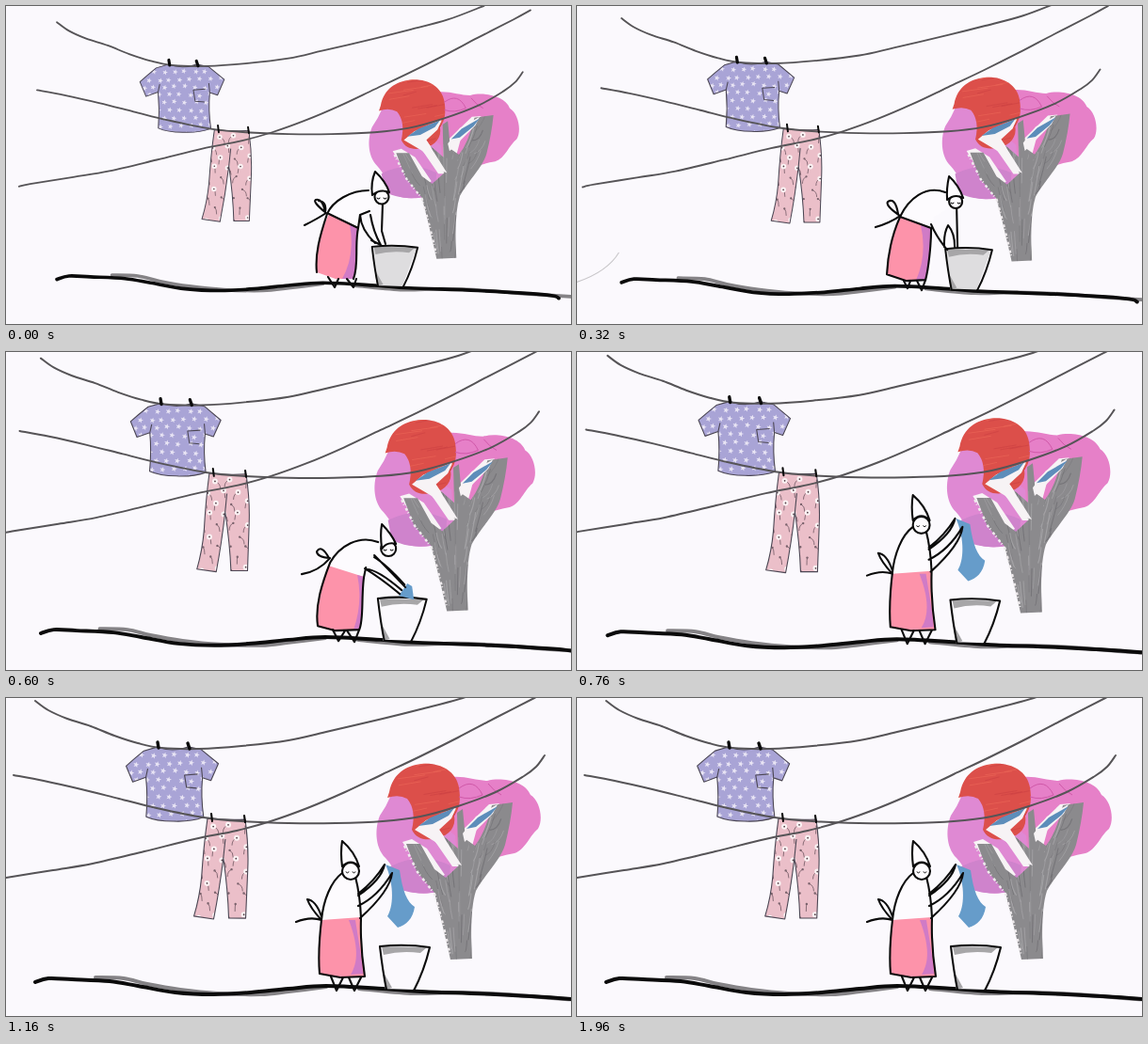
These frames come from a looping animation (600 by 338 pixels, 2000 ms). An HTML page:

```html
<!DOCTYPE html>
<html lang="en">
<head>
<meta charset="utf-8">
<title>Washing day</title>
<style>
html, body { margin: 0; width: 100%; height: 100%; overflow: hidden; background: #fbf9fd; }
svg { display: block; width: 100vw; height: 100vh; }
.ink, .shadow { fill: none; stroke: #0b0b0b; stroke-width: 2.1; stroke-linecap: round; stroke-linejoin: round; }
.shadow { stroke: #858386; stroke-width: 4; }
.earth { stroke-width: 4; }
.peg { stroke-width: 3.4; }
.rope { fill: none; stroke: #565457; stroke-width: 2; stroke-linecap: round; }
.paper { fill: #fdfbfe; }
.skirt { fill: #fd93aa; }
.shade { fill: #d07bc6; }
.cloth { fill: #669cca; }
.seam { fill: none; stroke: #4b4653; stroke-width: 1.1; stroke-linejoin: round; }
</style>
</head>
<body>
<svg viewBox="0 0 600 338" preserveAspectRatio="none">
  <defs>
    <path id="shirtShape" d="M147 56L161 52Q178 58 194 52L208 55L226 70L218 88L209 85Q207 105 210 127Q195 132 178 131Q160 131 149 126Q151 105 149 84L135 89L128 72Q137 64 147 56Z"/>
    <path id="pantsShape" d="M214 128Q235 130 254 129Q258 157 257 182L255 234L237 234Q236 204 231 170Q227 204 221 235L200 232Q206 212 208 190Q210 157 214 128Z"/>
    <path id="trunkShape" d="M472 278L495 277Q492 227 499 205C508 188 526 171 530 156Q536 132 538 111L516 114Q509 143 498 157L488 150L485 118L479 122L480 160L465 147L471 166L481 178L467 191L455 182L440 155L425 155L436 184L455 207Q464 242 472 278Z"/>
    <path id="crownShape" d="M407 100C411 80 425 72 441 70C460 68 478 77 481 95C483 108 482 117 476 125C478 137 471 146 458 149C445 152 436 150 431 140Q436 119 426 107Q417 102 405 106Z"/>
    <clipPath id="shirtClip"><use href="#shirtShape"/></clipPath>
    <clipPath id="pantsClip"><use href="#pantsShape"/></clipPath>
    <clipPath id="trunkClip"><use href="#trunkShape"/></clipPath>
    <clipPath id="crownClip"><use href="#crownShape"/></clipPath>
  </defs>
  <g id="camera">
    <g id="tree">
      <path fill="#e680c8" d="M474 84C488 83 500 88 511 88C526 84 551 88 557 103C567 109 571 129 565 139C556 146 552 161 540 165Q522 168 508 175L470 160Z"/>
      <path fill="#df89d3" d="M409 103C426 100 434 108 444 121L477 146L481 195C459 212 430 210 416 200C415 186 410 178 403 170C391 158 392 137 397 125Q404 115 409 103Z"/>
      <path fill="#cf83cc" d="M408 179Q440 163 472 178L470 200C457 211 425 209 412 200Z"/>
      <use href="#crownShape" fill="#dc4f4a"/>
      <g id="crownGrain" clip-path="url(#crownClip)"></g>
      <path fill="none" stroke="#cf58a8" d="M481 96Q497 84 506 103Q493 109 481 105M512 91Q518 99 526 103"/>
      <path fill="#f7f3f5" d="M421 153L431 150L447 160L466 188L456 193L436 177ZM434 140L446 130L478 116L472 126L458 137L487 179L474 179L456 153ZM480 164L480 145L513 113L524 112L500 139L493 165Z"/>
      <use href="#trunkShape" fill="#8b8a8d"/>
      <g id="trunkGrain" clip-path="url(#trunkClip)"></g>
      <path fill="#f7f3f5" d="M438 138L463 126L478 117L473 128L460 140L484 178L478 176L452 149ZM485 144L499 126L522 113L517 123L499 141L487 153Z"/>
      <path fill="#5d8dba" d="M438 136L451 127L476 117L470 125L453 134ZM489 139L501 127L522 115L515 124L499 137Z"/>
      <path fill="none" stroke="#eeeaec" stroke-width="2.5" stroke-dasharray="3 2 1 4" d="M423 157L437 185L455 208Q465 242 472 275"/>
    </g>
    <g id="ground"></g>
    <g id="shirt">
      <use href="#shirtShape" fill="#a9a4d6"/>
      <g id="stars" clip-path="url(#shirtClip)" fill="#e8e4f4"></g>
      <use href="#shirtShape" class="seam"/>
      <path class="seam" d="M204 81L190 82L192 95L203 96M149 84L151 75M209 85L208 74"/>
    </g>
    <g id="pants">
      <use href="#pantsShape" fill="#ebbfc9"/>
      <g id="flowers" clip-path="url(#pantsClip)"></g>
      <use href="#pantsShape" class="seam"/>
      <path class="seam" d="M231 170L233 150"/>
    </g>
    <g id="ropes"></g>
    <path class="ink peg" d="M161 47L162 53M193 48L195 54"/>
    <path class="ink" d="M218 123L219 131M253 125L254 132"/>
    <g id="bucket">
      <path id="bucketFill" d="M397 264L449 265L432 311L403 310Z"/>
      <path fill="#a7a6a8" d="M399 264L447 265L440 271Q420 268 401 273Z"/>
      <path fill="#a7a6a8" d="M400 290L410 308L403 310Z"/>
      <path class="ink" d="M397 264Q424 261 450 265Q444 290 433 311L404 310Q400 290 397 264"/>
    </g>
    <g id="poses"></g>
    <path id="wisp" fill="none" stroke="#c9c7ca" stroke-width="1.2" d="M-21 302Q15 290 28 268"/>
  </g>
</svg>
<script>
const LOOP = 2000, ZOOM = 1.0936, ZOOM_TIME = 900;
const $ = id => document.getElementById(id);
const add = (id, markup) => $(id).insertAdjacentHTML('beforeend', markup);
const path = (cls, d) => `<path class="${cls}" d="${d}"/>`;
const about = k => `translate(300 169) scale(${k}) translate(-300 -169)`;

let seed = 7;
const rand = () => (seed = seed * 16807 % 2147483647) / 2147483647;

// Smooth curve through points given as "x,y x,y ..."
function curve(text) {
  const p = text.split(' ').map(s => s.split(',').map(Number));
  let d = `M${p[0]}`;
  for (let i = 0; i < p.length - 1; i++) {
    const a = p[i - 1] || p[i], b = p[i], c = p[i + 1], e = p[i + 2] || c;
    d += `C${b.map((v, j) => v + (c[j] - a[j]) / 6)} ${c.map((v, j) => v - (e[j] - b[j]) / 6)} ${c}`;
  }
  return d;
}

[
  '31,3 45,13 65,22 90,30 115,40 140,48 165,53 205,54 250,51 300,45 340,36 400,22 440,12 485,0 527,-16',
  '8,82 40,88 80,97 120,107 160,117 210,127 250,131 300,133 350,133 400,131 440,126 480,115 520,100 550,83 563,73 572,61',
  '-13,194 0,191 50,183 92,176 147,163 200,150 245,141 281,131 320,117 360,100 400,81 440,62 480,42 520,21 561,0 581,-11'
].forEach(points => add('ropes', path('rope', curve(points))));

add('ground',
  path('shadow', curve('95,297 125,298 150,304 185,310 225,314 270,315 300,312 340,307')) +
  path('shadow', curve('375,309 430,314 480,313 530,315 580,319 628,322')) +
  path('ink earth', curve('31,302 45,298 70,299 110,301 140,306 180,313 220,315 260,313 300,309 340,306 400,309 440,312 520,315 600,320 614,324')));

// Wood grain
for (let i = 0; i < 130; i++) {
  const x = 422 + rand() * 116, y = 110 + rand() * 155, tilt = (x - 482) * .28;
  const tone = rand() < .5 ? '#6c6b6f' : '#aeadb0';
  add('trunkGrain', `<path d="M${x} ${y}q${-tilt * .3} 12 ${-tilt} ${12 + rand() * 22}" fill="none" stroke="${tone}" stroke-width="${.5 + rand() * .8}" opacity=".65"/>`);
}
for (let i = 0; i < 22; i++) {
  const x = 405 + rand() * 65, y = 72 + rand() * 75;
  add('crownGrain', `<path d="M${x} ${y}l${14 + rand() * 18} -4" stroke="${rand() < .5 ? '#ef6b5b' : '#c93f43'}" opacity=".55"/>`);
}

// Shirt stars
function star(x, y, r) {
  const points = Array.from({ length: 10 }, (_, i) => {
    const angle = i * Math.PI / 5 - 1.3, q = i % 2 ? r * .42 : r;
    return `${x + q * Math.cos(angle)},${y + q * Math.sin(angle)}`;
  });
  return `<polygon points="${points.join(' ')}"/>`;
}
for (let row = 0; row < 9; row++)
  for (let col = 0; col < 9; col++)
    add('stars', star(131 + col * 12 + (row % 2) * 6 + rand() * 3, 59 + row * 9 + rand() * 3, 3.3));

// Pants flowers
for (let row = 0; row < 9; row++)
  for (let col = 0; col < 4; col++) {
    const x = 204 + col * 16 + (row % 2) * 8 + rand() * 4, y = 134 + row * 12 + rand() * 4;
    const dx = rand() * 12 - 6;
    add('flowers', `<path d="M${x} ${y}q${dx} 2 ${dx} 8" fill="none" stroke="#6d5560" stroke-width=".8"/>` +
      (rand() < .6 ? `<circle cx="${x}" cy="${y}" r="3" fill="#fbf3f4"/><circle cx="${x}" cy="${y}" r=".9" fill="#55434b"/>` : `<circle cx="${x}" cy="${y}" r="1.2" fill="#7a626c"/>`));
  }

const face = (x, y, r) =>
  `<circle class="ink" cx="${x}" cy="${y}" r="${r}" style="fill:#fdfbfe"/>` +
  `<path class="ink" style="stroke-width:1" d="M${x - 5} ${y + 1}q1.5 2 3 0M${x + 2} ${y + 1}q1.5 2 3 0"/>`;
const hat = d => path('paper', d) + path('ink', d);

// Each pose: time it ends, zoom it is laid out at, drawing
const poses = [
  { end: 240, k: ZOOM, art:
    path('paper', 'M392 198C372 190 350 203 342 221L374 237L376 222L398 210Z') +
    path('skirt', 'M343 221L374 236C370 255 375 275 369 290L350 290L330 283C328 262 334 240 343 221Z') +
    path('shade', 'M365 232L374 236C370 255 375 275 369 290L357 290Q371 265 365 232Z') +
    path('ink', 'M385 196C366 196 347 207 341 221C333 245 328 264 330 283M374 236C370 255 375 275 369 290M343 221L374 236L376 222L386 218M376 222Q377 238 392 252M387 222Q390 240 398 254L388 249M400 210L399 239L403 253') +
    path('ink', 'M317 233Q331 226 340 220Q325 208 329 206Q336 204 339 219Q341 208 332 207M342 288L349 299L353 290M362 290L369 299L372 290') +
    face(399, 203, 7.5) + hat('M389 201Q387 188 392 176Q403 186 407 198Q397 194 389 201Z') },
  { end: 440, k: ZOOM / 1.026, art:
    path('paper', 'M395 195C370 190 352 205 344 224L376 236L379 224L400 212Z') +
    path('skirt', 'M343 224L376 236C376 255 373 280 370 291L350 292L329 285C330 265 336 240 343 224Z') +
    path('shade', 'M365 233L376 236C376 255 373 280 370 291L360 291Q372 264 365 233Z') +
    path('ink', 'M391 198C370 190 352 205 343 224C335 242 330 265 329 285L350 292L370 291C373 280 376 255 376 236L343 224M376 232Q382 246 393 259M390 256Q389 242 394 233Q401 241 401 256M403 214L404 256') +
    path('ink', 'M317 235Q333 230 343 223Q327 212 330 208Q338 203 341 221M347 292L351 300L354 292M361 292L366 302L370 291') +
    face(402, 208, 7) + hat('M393 206Q392 194 395 181Q405 190 410 204Q401 199 393 206Z') },
  { end: 680, k: ZOOM / 1.068, art:
    path('cloth', 'M426 246L417 259L433 263L431 249Z') +
    path('paper', 'M396 202C375 194 353 207 342 227L380 239L398 216Z') +
    path('skirt', 'M342 227L380 239C377 260 380 285 375 295L350 296L331 291C330 270 336 245 342 227Z') +
    path('shade', 'M373 237L380 239C377 260 380 285 375 295L369 295Q379 267 373 237Z') +
    path('ink', 'M395 202C375 194 354 206 344 224C335 247 328 270 331 291L350 296L375 295C380 285 377 260 380 239M381 230Q399 241 418 257M382 231Q393 230 420 253M391 216Q404 229 424 250M391 218Q404 226 423 247M380 239L382 229') +
    path('ink', 'M314 236Q332 233 344 219Q330 218 330 212Q335 204 343 219M347 295L353 307L360 296M362 296L370 308L375 295') +
    face(406, 209, 8) + hat('M399 209Q397 194 399 183Q409 193 414 204Q405 201 399 209Z') },
  { end: LOOP, k: 1, art:
    path('cloth', 'M403 177L418 183C421 205 426 217 434 222C432 235 425 241 416 244L405 232C411 223 413 200 403 177Z') +
    path('paper', 'M357 186C345 195 337 215 335 236L377 235Q376 209 371 190Z') +
    path('skirt', 'M335 236L377 233C376 262 378 277 381 296L355 297L333 293C331 270 334 250 335 236Z') +
    path('shade', 'M364 236L371 236C375 262 378 277 379 293L366 294C376 278 372 257 364 236Z') +
    path('ink', 'M357 186C345 195 337 215 335 236Q331 270 333 293L355 297L381 296Q376 263 377 234Q376 209 371 190M374 208Q391 195 402 177Q399 193 374 210M374 221Q395 211 410 186Q408 205 376 234') +
    path('ink', 'M308 238Q323 232 335 236Q323 223 320 214Q329 215 335 232M345 296L351 311L358 297M364 297L370 311L377 297') +
    face(366, 184, 9) + hat('M357 179Q355 164 357 152Q370 163 375 179Q366 170 357 179Z') }
];
poses.forEach(p => add('poses', `<g transform="${about(p.k)}">${p.art}</g>`));
const poseNodes = [...$('poses').children];

function draw(t) {
  const u = Math.min(t / ZOOM_TIME, 1), ease = u * u * (3 - 2 * u);
  $('camera').setAttribute('transform', about((1 + (ZOOM - 1) * ease) / ZOOM));
  const current = poses.findIndex(p => t < p.end);
  poseNodes.forEach((node, i) => node.style.display = i === current ? '' : 'none');
  $('bucketFill').setAttribute('fill', current < 2 ? '#dedddf' : '#fbf9fd');
  $('wisp').style.display = t >= 240 && t < 440 ? '' : 'none';
  const sway = -Math.cos(t / 1070 * 2 * Math.PI);
  $('shirt').setAttribute('transform', `translate(${.7 * sway} 0) rotate(${.4 * sway} 178 52)`);
  $('pants').setAttribute('transform', `rotate(${-.3 * sway} 236 128)`);
}

const start = performance.now();
function tick() {
  draw((performance.now() - start) % LOOP);
  requestAnimationFrame(tick);
}
draw(0);
requestAnimationFrame(tick);
</script>
</body>
</html>
```
